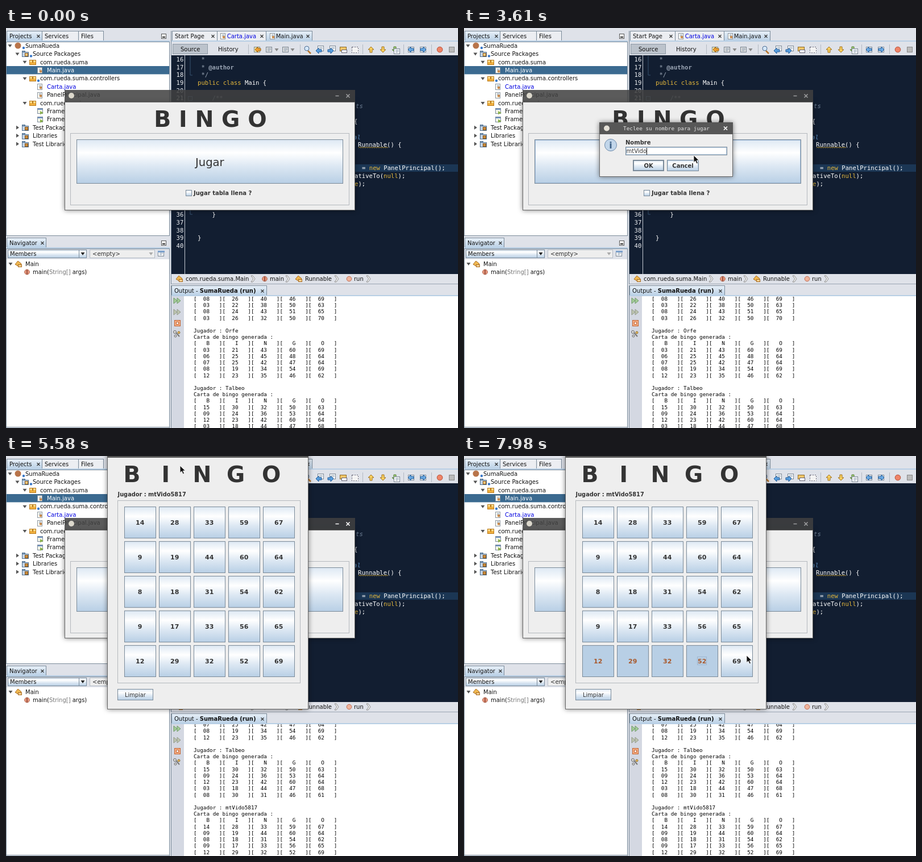
Write an HTML page that moves like this. It is 795 px wide and 704 px high and loops after 8 s.

```html
<!DOCTYPE html>
<html lang="es">
<head>
<meta charset="utf-8">
<style>
html, body { margin: 0; width: 100%; height: 100%; overflow: hidden; background: #eee; }
svg { display: block; width: 795px; height: 704px; font-family: "DejaVu Sans", sans-serif; }
text { white-space: pre; }
rect { shape-rendering: crispEdges; }
.m { font-family: "DejaVu Sans Mono", monospace; }
.b { font-weight: bold; }
.i { font-style: italic; }
.mid { text-anchor: middle; }
.soft { shape-rendering: auto; }
.shadow { filter: drop-shadow(0 0 4px rgba(0,0,0,.5)); }
</style>
</head>
<body>
<svg id="stage" viewBox="0 0 795 704"></svg>
<script>
const EDGE = '#7a8a99', FLAT = '#b8cfe5', PANEL = '#eeeeee', CHROME = '#dfe2e9', GUTTER = '#d4d8e2';
const GOLD = '#e5b83c', USER = 'mtVido5817';

const rect = (x, y, w, h, fill, stroke, extra = '') => stroke
  ? `<rect x="${x + .5}" y="${y + .5}" width="${w - 1}" height="${h - 1}" fill="${fill}" stroke="${stroke}" ${extra}/>`
  : `<rect x="${x}" y="${y}" width="${w}" height="${h}" fill="${fill}" ${extra}/>`;
const text = (x, y, s, size = 10, fill = '#111', cls = '', extra = '') =>
  `<text x="${x}" y="${y}" font-size="${size}" fill="${fill}" class="${cls}" ${extra}>${s}</text>`;
const path = (d, fill = 'none', stroke = 'none', w = 1) =>
  `<path d="${d}" fill="${fill}" stroke="${stroke}" stroke-width="${w}"/>`;
const dot = (x, y, r, fill, stroke = 'none') =>
  `<circle cx="${x}" cy="${y}" r="${r}" fill="${fill}" stroke="${stroke}"/>`;
const group = (id, body, extra = '') => `<g id="${id}" ${extra}>${body}</g>`;
const cross = (x, y, c = '#333', r = 2.5, w = 1.2) =>
  path(`M${x - r} ${y - r}l${2 * r} ${2 * r}m0 ${-2 * r}l${-2 * r} ${2 * r}`, 'none', c, w);
const down = (x, y, c = '#555') => path(`M${x - 3.5} ${y - 2}h7l-3.5 5z`, c);
const right = (x, y, c = '#555') => path(`M${x - 2} ${y - 3.5}v7l5 -3.5z`, c);

// Icons
const file = (x, y) => rect(x - 5, y - 5, 9, 11, '#fdfdf4', '#8c95a0') +
  path(`M${x - 2} ${y - 2}h4m-4 2h4`, 'none', '#7f95b5') + dot(x + 1, y + 2, 2.3, '#c98a4c');
const form = (x, y) => rect(x - 5, y - 5, 10, 10, '#f4f6e8', '#7c8a9c') +
  rect(x - 4, y - 4, 8, 2, '#6f94c4') + path(`M${x} ${y}l6 3l-6 3z`, '#8ab04a');
const pack = (x, y) => rect(x - 6, y - 4, 12, 9, '#f0b040', '#b87818') +
  rect(x - 5, y - 3, 10, 3, '#fbdc8c') + rect(x - 1, y - 4, 2, 5, '#b87818');
const folder = (x, y, c) => rect(x - 6, y - 5, 6, 3, '#8aa5c2', '#51708f') +
  rect(x - 6, y - 3, 12, 9, '#c3d4e6', '#51708f') + rect(x - 1, y - 1, 6, 6, c, '#8a5a20');
const cls = (x, y) => path(`M${x - 6} ${y + 1}l5 -6l6 5l-4 5z`, '#f0b850', '#a86a20') +
  rect(x - 1, y + 1, 7, 5, '#f4d090', '#a86a20');
const method = (x, y) => dot(x, y, 4.3, '#e89a80', '#a8553c') + path(`M${x} ${y - 4}v8`, 'none', '#7d3625', 1.4);
const page = (x, y, c = '#fff') => rect(x - 6, y - 5, 11, 10, c, '#7b8794') +
  path(`M${x - 3} ${y - 2}h6m-6 2h6m-6 2h4`, 'none', '#8fa0b2');
const arrow = (x, y, turn, fill, stroke) =>
  `<g transform="translate(${x} ${y}) rotate(${turn})">${path('M-5 0L0 -5v3h5v4h-5v3z', fill, stroke)}</g>`;

const tab = (x, y, w, h, label, on, fill = '#111') =>
  rect(x, y, w, h, on ? 'url(#tab)' : '#eceef2', EDGE) + text(x + 5, y + 13, label, 10, fill);
const minimize = (x, y) => rect(x - 4, y - 4, 9, 9, '#fff', '#555') + rect(x - 2, y + 1, 5, 2, '#333');

function leftSide() {
  let s = tab(1, 5, 63, 19, 'Projects', 1) + cross(57, 14.5) + tab(63, 5, 65, 18, 'Services') +
    tab(127, 5, 45, 18, 'Files') + minimize(277, 14) + rect(1, 22, 287, 3, FLAT) +
    rect(0, 24, 288, 342, '#fff', EDGE);
  const rows = [
    [34, 'SumaRueda'], [47, 'Source Packages'], [60, 'com.rueda.suma'], [72, 'Main.java'],
    [60, 'com.rueda.suma.controllers'], [72, 'Carta.java'], [72, 'PanelPrincipal.java'],
    [60, 'com.rueda.gui'], [72, 'FrameCarta.java'], [72, 'FrameMain.java'],
    [47, 'Test Packages'], [47, 'Libraries'], [47, 'Test Libraries']];
  s += rect(1, 67, 286, 14.4, '#3b6a90', '', 'class="soft"');
  rows.forEach(([x, label], i) => {
    const y = 31 + i * 14.42, c = i === 3 ? '#fff' : i === 5 ? '#0000e0' : '#111';
    s += text(x, y + 3.7, label, 10, c);
    if (i === 0) s += down(7, y) + dot(21, y, 5.5, '#b8744a');
    else if (x === 47) s += (i === 1 ? down(20, y) : right(20, y)) + folder(34, y, i === 1 ? '#f2c878' : '#c98a3a');
    else if (x === 60) s += down(33, y) + pack(47, y);
    else s += (i > 7 ? form : file)(60, y);
    if (i < 2 || i === 4) s += dot(i === 0 ? 31 : i === 1 ? 44 : 57, y + 4, 2.2, '#3a78c8');
  });
  s += tab(1, 369, 70, 19, 'Navigator', 1) + cross(64, 378.5) + minimize(277, 378) +
    rect(1, 386, 287, 3, FLAT) + rect(0, 388, 288, 330, 'none', EDGE);
  s += rect(3, 390, 139, 15, 'url(#btn)', EDGE) + rect(128, 390, 14, 15, 'url(#btn)', EDGE) + down(135, 397, '#222') +
    text(7, 401, 'Members') + rect(147, 390, 115, 15, '#eee', '#b5bdc6') + down(255, 397, '#aaa') +
    text(152, 401, '&lt;empty&gt;', 10, '#333') + page(273, 397) + rect(267, 392, 12, 3, '#7ba0cc');
  s += rect(1, 407, 286, 296, '#fff') + down(8, 415) + cls(22, 415) + text(34, 418.6, 'Main') +
    method(37, 429.5) + text(47, 433, 'main(<tspan fill="#777">String[]</tspan> args)');
  return s + rect(0, 702, 288, 1, EDGE);
}

function toolbar() {
  let s = rect(292, 24, 503, 25, CHROME) + rect(293, 28, 62, 18, '#bcc3cc', '#8f9aa6') +
    text(307, 41, 'Source') + text(373, 41, 'History');
  [426, 517, 627, 699, 748].forEach(x => s += rect(x, 29, 1, 17, '#b3b9c3'));
  s += page(442, 38, '#fbe9a0') + arrow(443, 38, 0, '#f0a030', '#9a6010') + page(463, 38, '#ddd') + down(476, 38, '#888') +
    page(492, 38, '#ddd') + down(504, 38, '#888');
  s += path('M531 40l5 5', 'none', '#b8762c', 2.5) + dot(529, 36, 4, '#d5e8fa', '#4d6d92');
  s += page(554, 36) + arrow(550, 40, 0, '#5aa0e0', '#205a98') + page(575, 36) + arrow(571, 40, 180, '#5aa0e0', '#205a98');
  s += rect(587, 33, 12, 8, '#f6c668', '#8a6a28') + rect(590, 38, 10, 6, '#fff', '#667') + rect(608, 33, 12, 11, '#f3f3f3', '#667', 'stroke-dasharray="2"');
  s += arrow(642, 38, 90, '#f8d060', '#a06f18') + arrow(663, 38, -90, '#f8d060', '#a06f18') + arrow(684, 38, -90, '#a8d080', '#4f7a2c') +
    page(688, 41) + page(713, 38) + arrow(712, 38, 0, '#6aaae4', '#205a98') + page(734, 38) + arrow(734, 38, 180, '#6aaae4', '#205a98');
  return s + dot(763, 38, 4.8, '#ee8468', '#b85038') + rect(779, 33, 10, 10, '#bbb', '#888');
}

function editor() {
  let s = tab(292, 5, 80, 18, 'Start Page') + cross(364, 14.5) + tab(371, 5, 87, 18, '    Carta.java', 0, '#0000e0') +
    file(382, 14) + cross(450, 14.5) + tab(457, 5, 82, 19, '    Main.java', 1) + file(469, 14) + cross(531, 14.5) +
    rect(291, 22, 504, 2, FLAT) + toolbar() + rect(291, 48, 504, 385, '#121e31') + rect(316, 240, 479, 13, '#1b3654') +
    rect(314, 48, 1, 385, '#c4cad2') + rect(290, 5, 1, 446, EDGE);
  const row = n => 59 + (n - 16) * 13.67;
  const code = (n, x, body, c = '#fff', k = '') => s += text(x, row(n), body, 10.6, c, 'm ' + k);
  const key = w => `<tspan fill="${GOLD}">${w}</tspan>`;
  for (let n = 16; n < 41; n++) code(n, 299.5, n, '#eef0f3');
  code(16, 337, ' *', '#9aa5b4');
  code(17, 337, ' * <tspan class="b">@author</tspan>', '#9aa5b4');
  code(18, 337, ' */', '#9aa5b4');
  code(19, 337, `${key('public class')} Main {`);
  code(21, 337, '    /**', '#9aa5b4');
  code(22, 615, 'ts', '#6f8096', 'i');
  code(24, 612, '{');
  code(26, 611, 'al', '#5c8fc0', 'i');
  code(27, 619, 'Runnable() {');
  code(30, 626, `= ${key('new')} PanelPrincipal();`);
  code(31, 613, `ativeTo(${key('null')});`);
  code(32, 613, `${key('e')});`);
  code(36, 337, '    }');
  code(39, 337, '}');
  let wave = 'M620 211';
  for (let i = 0; i < 13; i++) wave += 'l2 -1.5l2 1.5';
  s += path(wave, 'none', GOLD, .8) + path('M324 49v34h4M324 130v198h4', 'none', '#34506e') + rect(320, 120, 8, 8, '#121e31', '#4a6a8c');
  const chevron = x => path(`M${x} 436h3l4 5.5l-4 5.5h-3l4 -5.5z`, '#f5f5f5', '#888');
  s += rect(291, 433, 504, 18, CHROME) + cls(305, 441) + text(316, 445, 'com.rueda.suma.Main') + chevron(431) +
    method(455, 441.5) + text(464, 445, 'main') + chevron(492) + cls(515, 441) + text(526, 445, 'Runnable') +
    chevron(578) + dot(603.5, 441.5, 4.3, '#efb49c', '#c06a50') + text(612, 445, 'run') + chevron(634);
  return s + rect(291, 450, 504, 1, '#9aa5b2');
}

const CARD = '14 28 33 59 67|9 19 44 60 64|8 18 31 54 62|9 17 33 56 65|12 29 32 52 69';

function output() {
  let s = tab(291, 453, 168, 19, 'Output - <tspan class="b">SumaRueda (run)</tspan>', 1) + cross(451, 463) +
    rect(291, 470, 504, 2, FLAT) + rect(291, 472, 22, 232, GUTTER) + rect(290, 453, 1, 251, EDGE) + rect(313, 472, 482, 232, '#fff');
  [[480, '#a4cc98', '#6f9a68'], [500, '#bdc4b0', '#929a88']].forEach(([y, f, c]) =>
    s += path(`M295 ${y - 5}l6 5l-6 5zM301 ${y - 5}l6 5l-6 5z`, f, c));
  s += rect(296, 514, 11, 11, '#f6b088', '#c0602c') + rect(299, 517, 5, 5, '#fff', '#c0602c') +
    path('M297 534l8 9', 'none', '#777', 2) + dot(297, 535, 2.5, '#ddd', '#666') + dot(304, 536, 2, '#f0c060', '#8a6a28') + dot(298, 542, 2, '#ddd', '#666');
  const cells = list => list.map(v => `[  ${v.padStart(2, '0')}   ]`).join('');
  const rows = str => str.split('|').map(r => cells(r.split(' ')));
  const block = (who, nums) => ['', 'Jugador : ' + who, 'Carta de bingo generada :', cells([...'BINGO'].map(c => ' ' + c)), ...rows(nums)];
  const lines = [
    ...rows('08 26 40 46 69|03 22 38 50 63|08 24 43 51 65|03 26 32 50 70'),
    ...block('Orfe', '03 21 43 60 69|06 25 45 48 64|07 25 42 47 64|08 19 34 54 69|12 23 35 46 62'),
    ...block('Talbeo', '15 30 32 50 63|09 24 36 53 64|12 23 42 60 64|03 18 44 47 68|08 30 31 46 61'),
    ...block(USER, CARD)];
  const log = lines.map((l, i) => text(330, 479.9 + i * 11.22, l, 9.32, '#000', 'm')).join('');
  return s + `<g clip-path="url(#log)">${group('scroll', log)}</g>`;
}

const button = (x, y, w, h, id = '') => rect(x, y, w, h, 'url(#btn)', EDGE, id && `id="${id}"`);

function mainWindow() {
  return rect(103, 130, 511, 191, PANEL, '#666', 'class="shadow"') + rect(103, 109, 511, 21, '#404040', '', 'opacity=".86"') +
    dot(115, 119, 5, '#dcd8cc') +
    group('winBtns', path('M579.5 119.5h6', 'none', '#fff', 1.5) + cross(601.5, 119.5, '#fff', 3, 1.6)) +
    text(260.3, 174.4, 'B I N G O', 39.4, '#333', 'b') + rect(113, 185, 491, 127, 'none', '#b4b8bd') +
    button(124, 196, 469, 78, 'play') + rect(125, 197, 467, 76, 'none', '#a3bedb', 'id="playHover"') +
    text(358.3, 242.6, 'Jugar', 19.6, '#333', 'mid') + rect(316, 285, 11, 11, 'url(#btn)', EDGE) +
    text(330, 293.6, 'Jugar tabla llena ?', 10, '#333', 'b');
}

function dialog() {
  return rect(238, 166, 235, 96, PANEL, '#666', 'class="shadow"') + rect(238, 166, 235, 21, '#575757') +
    dot(251, 176.5, 5, '#e4e0d6') + text(280, 179.6, 'Teclee su nombre para jugar', 9.35, '#e4e4e4', 'm') +
    cross(460, 176.5, '#fff', 3, 1.7) + dot(258, 206, 10.5, '#c2d6ea', '#6f8cab') +
    text(258, 212, 'i', 16, '#3f6186', 'b mid') + text(284, 204.7, 'Nombre', 10, '#333', 'b') +
    rect(284, 209, 179, 15, '#fff', EDGE) + rect(285, 210, 177, 13, 'none', FLAT) +
    text(285.5, 220.3, '', 10, '#333', '', 'id="typed"') + rect(286, 211, 1, 12, '#111', '', 'id="caret"') +
    button(297, 232, 55, 20) + rect(298, 233, 53, 18, 'none', EDGE) + text(324.5, 245.6, 'OK', 10, '#333', 'b mid') +
    button(357, 232, 56, 20) + rect(358, 233, 54, 18, 'none', FLAT) + text(385, 245.6, 'Cancel', 10, '#333', 'b mid');
}

function cardWindow() {
  let s = rect(178, -4, 354, 450, PANEL, '#666', 'class="shadow"') + rect(178, 0, 354, 3, '#555');
  [206.4, 273.5, 328.5, 388, 450].forEach((x, i) => s += text(x, 45.7, 'BINGO'[i], 39.2, '#333', 'b'));
  s += text(196.5, 70.6, 'Jugador : ' + USER, 9.8, '#333', 'b') + rect(196, 78, 322, 322, 'none', '#b4b8bd');
  CARD.split('|').forEach((row, r) => row.split(' ').forEach((n, c) => {
    const x = 208 + 61 * c, y = 89 + 61 * r, last = r === 4;
    s += button(x, y, 56, 56, last ? 'cell' + c : '') +
      text(x + 27.7, y + 32, n, 11, '#333', 'b mid', last ? `id="num${c}"` : '');
  }));
  return s + rect(227, 353, 17, 15, 'none', '#9db6d0', 'id="focus"') + button(196, 410, 63, 20) + text(209, 423.6, 'Limpiar', 9.8, '#333');
}

const grad = (id, stops) => `<linearGradient id="${id}" x2="0" y2="1">` +
  stops.map(([o, c]) => `<stop offset="${o}" stop-color="${c}"/>`).join('') + '</linearGradient>';

document.getElementById('stage').innerHTML = '<defs>' +
  grad('btn', [[0, '#dde8f3'], [.3, '#fff'], [.6, '#dde8f3'], [1, FLAT]]) +
  grad('tab', [[0, '#e8f0f8'], [1, FLAT]]) +
  '<clipPath id="log"><rect x="313" y="472" width="482" height="232"/></clipPath></defs>' +
  rect(0, 0, 795, 704, CHROME) + leftSide() + editor() + output() + mainWindow() +
  group('dialog', dialog()) + group('card', cardWindow()) +
  group('mouse', path('M0 0v12.5l3 -2.6l2.2 4.8l2.2 -1l-2.1 -4.6h4z', '#111', '#fff', .8));

const $ = id => document.getElementById(id);
const show = (id, on) => $(id).setAttribute('display', on ? 'inline' : 'none');
const set = (id, name, v) => $(id).setAttribute(name, v);

const KEYS = [2280, 2870, 3210, 3350, 3410, 3610, 3850, 3915, 3980, 4180];
const CLICKS = [[6340, 6500], [6840, 7030], [7370, 7520], [7700, 7820]];
const MOVES = [[280, 590, 460], [360, 444, 324], [510, 444, 324], [690, 404, 224], [5020, 404, 224],
  [5220, 300, 364], [5580, 306, 17], [5800, 322, 1], [6040, 247, 342], [6260, 247, 342], [6340, 245, 359],
  [6540, 245, 359], [6660, 292, 360], [7030, 292, 360], [7160, 351, 359], [7540, 351, 359],
  [7660, 415, 357], [7820, 415, 357], [7980, 497, 351]];

function pointer(t) {
  const i = MOVES.findIndex(m => m[0] > t);
  if (i < 0) return MOVES[MOVES.length - 1].slice(1);
  if (i === 0) return MOVES[0].slice(1);
  const [t0, x0, y0] = MOVES[i - 1], [t1, x1, y1] = MOVES[i], k = (t - t0) / (t1 - t0);
  return [x0 + (x1 - x0) * k, y0 + (y1 - y0) * k];
}

function draw(t) {
  show('mouse', t >= 280);
  set('mouse', 'transform', `translate(${pointer(t)})`);
  set('winBtns', 'opacity', (t >= 690 && t < 900) || (t >= 4420 && t < 6300) ? 1 : .5);
  set('play', 'fill', t >= 690 && t < 760 ? FLAT : 'url(#btn)');
  show('playHover', t >= 630 && t < 4470);

  show('dialog', t >= 900 && t < 4420);
  const count = KEYS.filter(k => k <= t).length;
  $('typed').textContent = USER.slice(0, count);
  const width = count && t < 4420 ? $('typed').getComputedTextLength() : 0;
  set('caret', 'x', Math.round(285.5 + width));
  show('caret', Math.floor((t - (count ? KEYS[count - 1] : 900)) / 530) % 2 === 0);

  show('card', t >= 4470);
  set('scroll', 'transform', `translate(0 ${t >= 4640 ? -116 : 0})`);
  let focus = -1;
  CLICKS.forEach(([press, release], c) => {
    if (t >= press) focus = c;
    set('cell' + c, 'fill', t >= press ? FLAT : 'url(#btn)');
    set('num' + c, 'fill', t >= release ? '#a8592c' : '#333');
  });
  show('focus', focus >= 0);
  set('focus', 'transform', `translate(${61 * Math.max(focus, 0)} 0)`);
}

function tick() {
  draw(performance.now() % 8000);
  requestAnimationFrame(tick);
}
tick();
</script>
</body>
</html>
```
